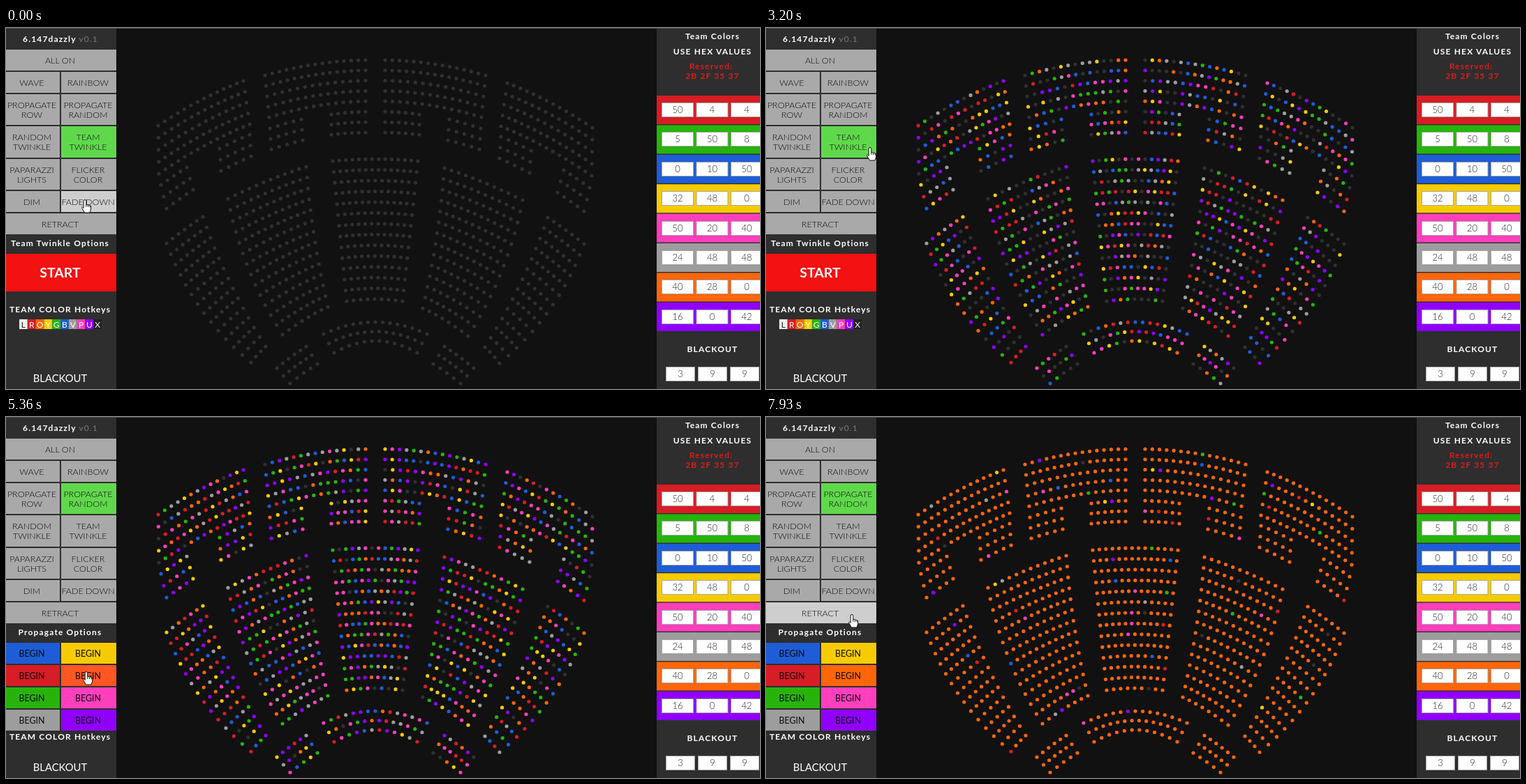
Write an HTML page that moves like this. It is 1080 px wide and 518 px high and loops after 8 s.

```html
<!DOCTYPE html>
<html lang="en">
<head>
<meta charset="utf-8">
<title>Seat lights</title>
<style>
html, body { margin: 0; width: 100%; height: 100%; overflow: hidden; background: #111; }
svg { display: block; width: 100%; height: 100%; font-family: Lato, sans-serif; }
text { text-anchor: middle; white-space: pre; }
.head { font-size: 12px; font-weight: 700; letter-spacing: 1.15px; fill: #fff; }
.label { font-size: 12.5px; font-weight: 300; fill: #0c0c0c; }
.begin { font-size: 12.4px; fill: #0c0c0c; }
.start { font-size: 19.5px; font-weight: 700; fill: #fff; }
.blackout { font-size: 14.8px; fill: #fff; }
.key { font-size: 12px; fill: #fff; }
.value { font-size: 13px; font-weight: 300; fill: #222; }
</style>
</head>
<body>
<svg id="stage" viewBox="0 0 1080 518" preserveAspectRatio="none"></svg>
<script>
const LOOP = 8000;
const START_AT = 1080, MODE_AT = 4010, SPREAD_AT = 5600, SPREAD_END = 8100;
const OFF = '#303030', PANEL = '#2e2e2e', GREY = '#a9a9a9', HOVER = '#cecece', ACTIVE = '#60d84c';
const RED = '#d71d25', GREEN = '#28b30c', BLUE = '#1f5dd6', YELLOW = '#f6cb00',
      PINK = '#ff3fbc', SILVER = '#9d9d9d', ORANGE = '#ff660a', PURPLE = '#9000ff';
const TEAMS = [RED, GREEN, BLUE, YELLOW, PINK, SILVER, ORANGE, PURPLE];

const stage = document.getElementById('stage');

function add(parent, tag, attrs, content) {
  const node = document.createElementNS('http://www.w3.org/2000/svg', tag);
  for (const key in attrs) node.setAttribute(key, attrs[key]);
  if (content !== undefined) node.textContent = content;
  return parent.appendChild(node);
}
const rect = (parent, x, y, width, height, fill) => add(parent, 'rect', { x, y, width, height, fill });
const text = (parent, x, y, cls, content) => add(parent, 'text', { x, y, class: cls }, content);

let seed = 2718;
function random() {
  seed = (seed + 0x6D2B79F5) | 0;
  let v = Math.imul(seed ^ (seed >>> 15), 1 | seed);
  v = (v + Math.imul(v ^ (v >>> 7), 61 | v)) ^ v;
  return ((v ^ (v >>> 14)) >>> 0) / 4294967296;
}
const anyTeam = () => TEAMS[Math.floor(random() * TEAMS.length)];
const mix = (a, b, k) => a + (b - a) * k;

// ---- seats ----
rect(stage, 0, 0, 1080, 518, '#111');
const seatLayer = add(stage, 'g', {});
const seats = [];

function addSeat(x, y) {
  const changes = [];
  let at = START_AT;
  while ((at -= Math.log(1 - random()) / 0.00062) < SPREAD_AT - 100) changes.push([at, anyTeam()]);
  seats.push({
    node: add(seatLayer, 'circle', { cx: x.toFixed(1), cy: y.toFixed(1), r: 2.6, fill: OFF }),
    changes,
    orangeAt: mix(SPREAD_AT, SPREAD_END, random()),
    fill: OFF
  });
}

// A point on a block's side edge, bowed outwards at right angles to it.
function edge(ax, ay, bx, by, bow, k) {
  const dx = bx - ax, dy = by - ay, push = 4 * k * (1 - k) * bow / Math.hypot(dx, dy);
  return [ax + dx * k - dy * push, ay + dy * k + dx * push];
}

// Curved rows between a first and a last row, each given as x0, y0, x1, y1.
function block(first, last, rows, sag, { bow = [0, 0], mirror = true, drop = 0, pitch = 10.5 } = {}) {
  for (let r = 0; r < rows; r++) {
    const k = r / (rows - 1);
    const [x0, y0] = edge(first[0], first[1], last[0], last[1], bow[0], k);
    const [x1, y1] = edge(first[2], first[3], last[2], last[3], bow[1], k);
    const gaps = Math.round(Math.hypot(x1 - x0, y1 - y0) / pitch - 0.15);
    for (let i = 0; i <= gaps; i++) {
      const u = i / gaps, x = mix(x0, x1, u), y = mix(y0, y1, u) - 4 * u * (1 - u) * sag;
      addSeat(x, y);
      if (mirror) addSeat(1058 - x, y + drop);
    }
  }
}

block([371, 68, 515, 46], [377, 128, 515, 105], 5, 5);
block([378, 144, 423, 131], [380, 174, 425, 161], 3, 0.5);
block([466, 124, 515, 120], [466, 153, 515, 150], 3, 0.7);
block([218, 140, 340, 76], [219, 209, 349, 138], 5, 4.5, { drop: 3 });
block([222, 225, 259, 200], [230, 259, 268, 232], 3, 0.5, { drop: 4 });
block([306, 173, 349, 153], [308, 205, 351, 184], 3, 0.5, { drop: 3 });
block([468, 191, 590, 191], [488, 392, 568, 392], 14, 3, { mirror: false, pitch: 9.3 });
block([318, 245, 430, 199], [396, 440, 461, 400], 14, 2.5, { bow: [10, 4], drop: 2 });
block([230, 309, 282, 271], [351, 480, 372, 457], 14, 1, { bow: [14, 6], drop: 1 });
block([455, 439, 603, 439], [470, 466, 589, 466], 3, 17, { mirror: false });
block([388, 488, 430, 457], [407, 510, 446, 482], 3, 1);

// ---- left panel ----
rect(stage, 0, 0, 158, 518, PANEL);
const title = text(stage, 78, 20, 'head', '6.147dazzly ');
add(title, 'tspan', { fill: '#777788', 'font-weight': 400 }, 'v0.1');

const buttons = [];
function button(parent, mode, x, y, w, h, label, fill, hover, cls) {
  const node = rect(parent, x, y, w, h, fill);
  const lines = label.split('|');
  const cx = w > 100 ? 77.5 : x ? 117.5 : 37;
  lines.forEach((line, i) =>
    text(parent, cx, y + h / 2 + 4.5 + (cls === 'start' ? 2.5 : 0) + (i - (lines.length - 1) / 2) * 14, cls, line));
  buttons.push({ node, mode, x, y, w, h, label, fill, hover });
}
function pair(parent, mode, y, h, labels, fills, hovers, cls) {
  button(parent, mode, 0, y, 77, h, labels[0], fills[0], hovers[0], cls);
  button(parent, mode, 79, y, 79, h, labels[1], fills[1], hovers[1], cls);
}
button(stage, '', 0, 31, 158, 30, 'ALL ON', GREY, HOVER, 'label');
[
  [63, 30, 'WAVE', 'RAINBOW'],
  [95, 44, 'PROPAGATE|ROW', 'PROPAGATE|RANDOM'],
  [141, 45, 'RANDOM|TWINKLE', 'TEAM|TWINKLE'],
  [188, 44, 'PAPARAZZI|LIGHTS', 'FLICKER|COLOR'],
  [234, 30, 'DIM', 'FADE DOWN']
].forEach(([y, h, ...labels]) => pair(stage, '', y, h, labels, [GREY, GREY], [HOVER, HOVER], 'label'));
button(stage, '', 0, 266, 158, 30, 'RETRACT', GREY, HOVER, 'label');

const twinkle = add(stage, 'g', {});
text(twinkle, 77.5, 313, 'head', 'Team Twinkle Options');
button(twinkle, 'twinkle', 0, 324, 158, 54, 'START', '#f41111', '#f41111', 'start');
text(twinkle, 77.5, 408, 'head', 'TEAM COLOR Hotkeys');
const keyFills = ['#eeeeee', RED, ORANGE, YELLOW, GREEN, BLUE, SILVER, PINK, PURPLE, '#222222'];
[...'LROYGBVPUX'].forEach((letter, i) => {
  const x = 19 + i * 11.8;
  rect(twinkle, x, 418, 11.8, 14, keyFills[i]);
  const key = text(twinkle, x + 5.9, 429.5, 'key', letter);
  if (!i) key.style.fill = '#222';
});

const propagate = add(stage, 'g', {});
text(propagate, 77.5, 313, 'head', 'Propagate Options');
[[BLUE, YELLOW], [RED, ORANGE], [GREEN, PINK], [SILVER, PURPLE]].forEach((fills, i) => {
  const hovers = fills.map(fill => fill === ORANGE ? '#ff5722' : fill);
  pair(propagate, 'propagate', 324 + i * 32, 30, ['BEGIN', 'BEGIN'], fills, hovers, 'begin');
});
text(propagate, 77.5, 463, 'head', 'TEAM COLOR Hotkeys');
text(stage, 77.5, 508, 'blackout', 'BLACKOUT');

// ---- right panel ----
rect(stage, 932, 0, 148, 518, PANEL);
text(stage, 1012, 16, 'head', 'Team Colors');
text(stage, 1012, 38, 'head', 'USE HEX VALUES');
text(stage, 1010, 59, 'head', 'Reserved:').style.fill = '#e01b1b';
text(stage, 1012, 73, 'head', '2B 2F 35 37').style.fill = '#e01b1b';

function field(x, y, w, value) {
  add(stage, 'rect', { x: x + 0.5, y: y + 0.5, width: w - 1, height: 20, fill: '#fff', stroke: '#a5a5a5' });
  text(stage, x + w / 2, y + 15.3, 'value', value);
}
['50 4 4', '5 50 8', '0 10 50', '32 48 0', '50 20 40', '24 48 48', '40 28 0', '16 0 42'].forEach((row, i) => {
  const y = 97 + i * 42.4;
  rect(stage, 932, y, 148, 41, TEAMS[i]);
  row.split(' ').forEach((value, j) => field(939 + j * 49.5, Math.round(y) + 10, 46, value));
});
text(stage, 1012, 465, 'head', 'BLACKOUT');
['3', '9', '9'].forEach((value, j) => field(945 + j * 46, 486, 42, value));
rect(stage, 0, 0, 1080, 1, '#4a4a4a');

// ---- pointer ----
const pointer = add(stage, 'g', {});
const shape = d => add(pointer, 'path', { d, fill: '#fff', stroke: '#111', 'stroke-width': 1, 'stroke-linejoin': 'round' });
const hand = shape('M-1.8 1.3a1.8 1.8 0 0 1 3.6 0V6.8l1-.5 1.8.9 1.1-.3 1.7 1 1.3.4V13L7 18H-.5L-4.2 11.6c-.7-1.6.8-2.4 1.6-1.2l.8 1ZM1.8 6.8v3M4.6 7.4v2.6M7.2 8v2.3');
const arrow = shape('M0 0V14.2l3.3-3.1 2.3 5.2 2.3-1-2.3-5H10Z');

// time, x, y of the pointer tip
const path = [
  [0, 113, 247], [30, 113, 247], [380, 104, 438], [680, 88, 352], [1020, 88, 352],
  [1720, 187, 388], [2000, 187, 388], [2490, 178, 300], [2640, 170, 250], [3000, 151, 176],
  [3200, 149, 172], [3440, 130, 132], [3860, 122, 125], [4280, 122, 125], [5010, 112, 368],
  [5360, 115, 366], [6330, 115, 366], [6920, 145, 235], [7100, 145, 235], [7740, 126, 286],
  [7930, 123, 284], [8000, 123, 284]
];
function pointerAt(t) {
  const i = Math.max(1, path.findIndex(p => p[0] > t));
  const a = path[i - 1], b = path[i];
  const u = (t - a[0]) / (b[0] - a[0]), k = u * u * (3 - 2 * u);
  return [mix(a[1], b[1], k), mix(a[2], b[2], k)];
}

function seatFill(seat, t) {
  if (t >= seat.orangeAt) return ORANGE;
  let fill = OFF;
  for (const [at, colour] of seat.changes) {
    if (at > t) break;
    fill = colour;
  }
  return fill;
}

function render(t) {
  const mode = t < MODE_AT ? 'twinkle' : 'propagate';
  twinkle.style.display = mode === 'twinkle' ? '' : 'none';
  propagate.style.display = mode === 'propagate' ? '' : 'none';

  const [x, y] = pointerAt(t);
  const active = mode === 'twinkle' ? 'TEAM|TWINKLE' : 'PROPAGATE|RANDOM';
  let over = false;
  for (const b of buttons) {
    const hit = (!b.mode || b.mode === mode) && x >= b.x && x < b.x + b.w && y >= b.y && y < b.y + b.h;
    over = over || hit;
    b.node.setAttribute('fill', b.label === active ? ACTIVE : hit ? b.hover : b.fill);
  }
  pointer.setAttribute('transform', `translate(${x.toFixed(1)} ${y.toFixed(1)})`);
  hand.style.display = over ? '' : 'none';
  arrow.style.display = over ? 'none' : '';

  const tick = Math.floor(t / 65) * 65;
  for (const seat of seats) {
    const fill = seatFill(seat, tick);
    if (fill !== seat.fill) seat.node.setAttribute('fill', seat.fill = fill);
  }
}

const begin = performance.now();
function frame() {
  render((performance.now() - begin) % LOOP);
  requestAnimationFrame(frame);
}
frame();
</script>
</body>
</html>
```
